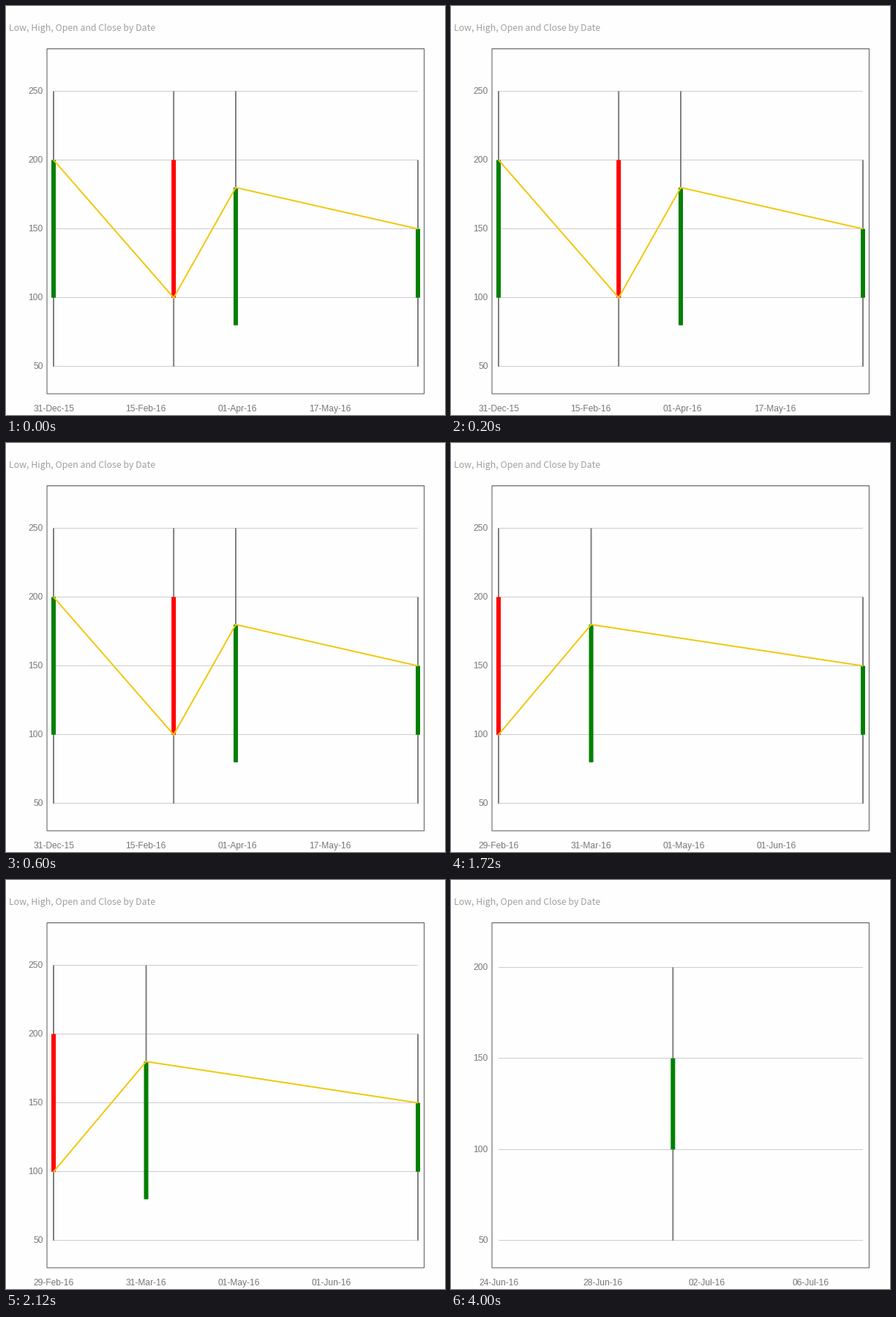
A matplotlib script that plays this animation: 600 by 559 pixels, repeating every 5960 ms.

```python
import matplotlib.pyplot as plt
from matplotlib.animation import FuncAnimation

W, H, DPI = 600, 559, 64
PX = 72 / DPI              # points per pixel
STEP, LOOP = 40, 5960      # ms
LEFT, RIGHT, BASE = 65, 563, 492.8

# day offset, low, high, open, close
TRADES = [
    (0, 50, 250, 100, 200),
    (60, 50, 250, 200, 100),
    (91, 80, 250, 80, 180),
    (182, 50, 200, 100, 150),
]

fig = plt.figure(figsize=(W / DPI, H / DPI), dpi=DPI, facecolor="#fefefe")
ax = fig.add_axes([0, 0, 1, 1])
ax.set(xlim=(0, W), ylim=(H, 0))
ax.axis("off")


def line(xs, ys, color, width, z):
    return ax.plot(xs, ys, color=color, lw=width * PX, zorder=z, snap=False,
                   solid_capstyle="butt", solid_joinstyle="miter")[0]


def label(x, y, text, ha="center", size=12, color="#777777", font="Liberation Sans"):
    return ax.text(x, y, text, ha=ha, va="baseline", fontsize=size * PX,
                   color=color, family=font)


def build_view(trades, start, span, top, unit, dates, tick):
    """Draw one date range and return its artists."""
    def px(day):
        return LEFT + (day - start) / span * (RIGHT - LEFT)

    def py(value):
        return BASE - (value - 50) * unit

    parts = []
    for v in range(50, top + 1, 50):
        y = int(py(v)) + 0.5
        parts.append(line([LEFT, RIGHT], [y, y], "#cdcdd1", 1, 1))
        parts.append(label(50.5, y + 3.5, str(v), ha="right"))
    for i, text in enumerate(dates):
        parts.append(label(px(start + i * tick), 554, text))
    for day, low, high, opened, closed in trades:
        x = px(day)
        color = "#008000" if closed > opened else "#ff0000"
        parts.append(line([x, x], [py(low), py(high)], "#808080", 2, 2))
        parts.append(line([x, x], [py(opened), py(closed)], color, 6, 3))
    if len(trades) > 1:
        parts.append(line([px(t[0]) for t in trades],
                          [py(t[4]) for t in trades], "#f2c80f", 2, 4))
    return parts


label(4, 34, "Low, High, Open and Close by Date", ha="left", size=12.35,
      color="#a0a0a0", font="Noto Sans CJK JP")
line([56, 571.5, 571.5, 56, 56, 571.5], [58.5, 58.5, 530, 530, 58.5, 58.5],
     "#66666c", 1.1, 1)

views = [
    build_view(TRADES, 0, 182, 250, 1.882,
               ["31-Dec-15", "15-Feb-16", "01-Apr-16", "17-May-16"], 46),
    build_view(TRADES[1:], 60, 122, 250, 1.882,
               ["29-Feb-16", "31-Mar-16", "01-May-16", "01-Jun-16"], 31),
    build_view(TRADES[3:], 175.3, 14, 200, 2.49,
               ["24-Jun-16", "28-Jun-16", "02-Jul-16", "06-Jul-16"], 4),
]
CUTS = (1720, 3800)


def update(frame):
    current = sum(frame * STEP >= cut for cut in CUTS)
    for i, parts in enumerate(views):
        for part in parts:
            part.set_visible(i == current)
    return [part for parts in views for part in parts]


anim = FuncAnimation(fig, update, frames=LOOP // STEP, interval=STEP,
                     repeat=True, repeat_delay=0, blit=False)
plt.show()
```
